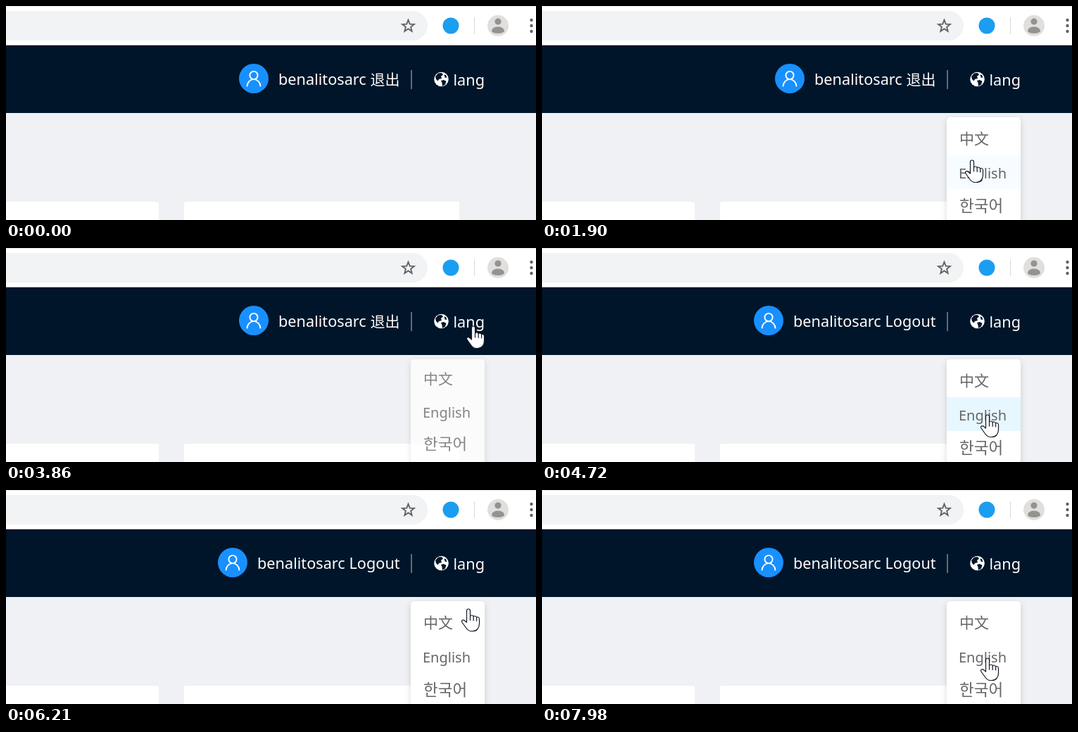
Write an HTML page that moves like this. It is 753x304 px and loops after 8000 ms.

```html
<!DOCTYPE html>
<html lang="en">
<head>
<meta charset="utf-8">
<title>Language menu</title>
<style>
  html, body { margin: 0; width: 100%; height: 100%; overflow: hidden; background: #f0f1f5; }
  svg { display: block; width: 753px; height: 304px; }
  text { font-family: "Noto Sans", "Open Sans", sans-serif; white-space: pre; }
  .head { font-size: 21.7px; font-weight: 500; fill: #fff; }
  .item { font-size: 20px; fill: #666; }
  .zh { font-family: "Noto Sans CJK SC", "Noto Sans CJK", sans-serif; font-size: 21px; font-weight: 400; }
  .ko { font-family: "Noto Sans CJK KR", "Noto Sans CJK", sans-serif; font-size: 22.5px; }
  .item.zh, .item.ko { font-weight: 300; }
  .row { fill: #e6f7ff; }
  #panel { filter: drop-shadow(0 3px 5px rgba(0, 0, 0, .15)); }
</style>
</head>
<body>
<svg viewBox="0 0 753 304" xmlns="http://www.w3.org/2000/svg">
  <rect width="753" height="304" fill="#f0f1f5"/>

  <!-- browser toolbar -->
  <rect width="753" height="56" fill="#fff"/>
  <rect width="753" height="1" fill="#e4e5e7"/>
  <rect y="55" width="753" height="1" fill="#bfc2c6"/>
  <rect x="-40" y="7" width="639" height="42" rx="21" fill="#f1f3f4"/>
  <path id="star" fill="none" stroke="#5f6368" stroke-width="1.9" stroke-miterlimit="10"/>
  <circle cx="632" cy="28" r="11.5" fill="#1b9df0"/>
  <rect x="665" y="16" width="1" height="24" fill="#d5d8dc"/>
  <circle cx="699" cy="28" r="15" fill="#e0dfdd"/>
  <g fill="#95938f">
    <circle cx="699" cy="22" r="4.6"/>
    <path d="M690 36.500C690 31 695 29.500 699 29.500S708 31 708 36.500Q704 39 699 39T690 36.500Z"/>
  </g>
  <g fill="#5f6368">
    <circle cx="746.5" cy="20" r="2.2"/><circle cx="746.5" cy="28" r="2.2"/><circle cx="746.5" cy="36" r="2.2"/>
  </g>

  <!-- page header -->
  <rect y="56" width="753" height="96" fill="#001529"/>
  <g id="user">
    <circle cx="352" cy="103" r="21" fill="#1890ff"/>
    <g fill="none" stroke="#fff" stroke-width="1.9" stroke-linecap="round">
      <circle cx="352" cy="98.5" r="5.6"/>
      <path d="M342.500 113.600c.4-5.400 4.600-9.500 9.500-9.500s9.100 4.100 9.500 9.500"/>
    </g>
    <text class="head" x="387" y="112">benalitosarc</text>
  </g>
  <text class="head zh" id="exitZh" x="517.5" y="112">退出</text>
  <text class="head" id="exitEn" x="487.5" y="112">Logout</text>
  <rect x="575" y="91" width="2" height="27" fill="#666869"/>
  <circle cx="618.5" cy="104" r="10.3" fill="#fff"/>
  <path d="M610 100l4-4.500 5-.5 2 2.500-3 2.500 1 3-4 1-1.500 2.500-2.500-2.500zM618 106l4-1 3.500 2-1.500 4.500-4 2.500-.5-4.500zM622.500 97.500l2.500.5 1.500 4-3-.5z" fill="#001529"/>
  <text class="head" x="635.5" y="113">lang</text>

  <!-- cards -->
  <g fill="#fff">
    <rect x="-10" y="278" width="227" height="40" rx="3"/>
    <rect x="253" y="278" width="391" height="40" rx="3"/>
  </g>

  <g id="menu">
    <rect id="panel" x="575" y="158" width="105" height="156" rx="5" fill="#fff"/>
    <rect class="row" x="575" y="164" width="105" height="48"/>
    <rect class="row" x="575" y="212" width="105" height="48"/>
    <rect class="row" x="575" y="260" width="105" height="48"/>
    <text class="item zh" x="593" y="196">中文</text>
    <text class="item" x="592" y="245">English</text>
    <text class="item ko" x="593" y="292">한국어</text>
  </g>

  <g id="hand" stroke="#14192a" stroke-width="1.2" stroke-linejoin="round" stroke-linecap="round">
    <path fill="#fff" d="M-2.500 19V2.500Q-2.500 0 0 0T2.500 2.500V10.500Q2.500 9 4.800 9T7.200 11Q7.500 10 9.300 10T11.600 12.300Q12 11.400 13.500 11.500T15.500 14V21C15.500 27 12 31.500 6 31.500H4C0 31.500 -2 29 -4 26L-9 19C-10.500 16.500 -7.500 14.500 -5.500 16.500Z"/>
    <path fill="none" d="M2.500 10.500V16M7.200 11.200V16.500M11.600 12.500V17"/>
  </g>
</svg>
<script>
const LOOP = 8000, STEP = 77;
const APPEAR = 600, SWITCH = 4700;
const $ = id => document.getElementById(id);
const rows = document.querySelectorAll('.row');

// The pointer rests between moves: start, end, destination
const home = { x: 662, y: 112 };
const moves = [
  [600, 1130, 652, 94],
  [1610, 1900, 611, 219],
  [2220, 2540, 616, 189],
  [2770, 3140, 650, 170],
  [3540, 3700, 664, 111],
  [4410, 4640, 633, 237],
  [5440, 5980, 661, 118],
  [6210, 6210, 657, 169],
  [6290, 6670, 640, 268],
  [6750, 6970, 644, 238],
  [7050, 7190, 666, 150],
  [7270, 7590, 668, 121],
  [7890, 7980, 633, 239]
];

// Start and end of each time the menu is open
const openings = [[800, 2850], [3690, 4800], [5620, 6960], [7360, LOOP]];

const hovers = [
  { row: 1, from: 1780, to: 2770, tint: .38 },
  { row: 1, from: 4490, to: 4900, tint: 1 },
  { row: 1, from: 6370, to: 6540, tint: 1 },
  { row: 2, from: 6540, to: 6750, tint: 1 },
  { row: 1, from: 6750, to: 6980, tint: 1 }
];

const clamp = v => Math.max(0, Math.min(1, v));
const easeOut = u => 1 - (1 - u) ** 2;

// Rises to 1 after `from`, falls back to 0 after `to`
const pulse = (t, from, to, fade) => clamp(Math.min(t - from, to + fade - t) / fade);

// Progress in even steps, with the first one taken at once
function stepped(t, start, end) {
  const n = Math.round((end - start) / STEP);
  return n ? clamp((Math.floor((t - start) / (end - start) * n) + 1) / (n + 1)) : 1;
}

function pointer(t) {
  let { x, y } = home;
  for (const [start, end, toX, toY] of moves) {
    if (t < start) break;
    const u = easeOut(stepped(t, start, end));
    x += (toX - x) * u;
    y += (toY - y) * u;
  }
  return `translate(${x} ${y})`;
}

function show(el, on) {
  el.setAttribute('visibility', on ? 'visible' : 'hidden');
}

function draw(t) {
  const english = t >= SWITCH;
  show($('exitZh'), !english);
  show($('exitEn'), english);
  $('user').setAttribute('transform', `translate(${english ? -30 : 0} 0)`);

  const open = Math.max(...openings.map(([from, to]) => pulse(t, from, to, 220)));
  show($('menu'), open > 0);
  $('menu').setAttribute('opacity', open);
  $('menu').setAttribute('transform', `translate(0 158) scale(1 ${.8 + .2 * open}) translate(0 -158)`);

  rows.forEach((row, i) => {
    const tints = hovers.filter(h => h.row === i).map(h => h.tint * pulse(t, h.from, h.to, 120));
    row.setAttribute('opacity', Math.max(0, ...tints));
  });

  show($('hand'), t >= APPEAR);
  $('hand').setAttribute('transform', pointer(t));
}

function starPath(cx, cy, outer, inner) {
  const points = Array.from({ length: 10 }, (_, i) => {
    const r = i % 2 ? inner : outer, a = (i / 5 - .5) * Math.PI;
    return `${cx + r * Math.cos(a)} ${cy + r * Math.sin(a)}`;
  });
  return `M${points.join('L')}Z`;
}

$('star').setAttribute('d', starPath(571.5, 28.7, 8.8, 3.8));

const begin = performance.now();
function tick() {
  draw((performance.now() - begin) % LOOP);
  requestAnimationFrame(tick);
}
tick();
</script>
</body>
</html>
```
